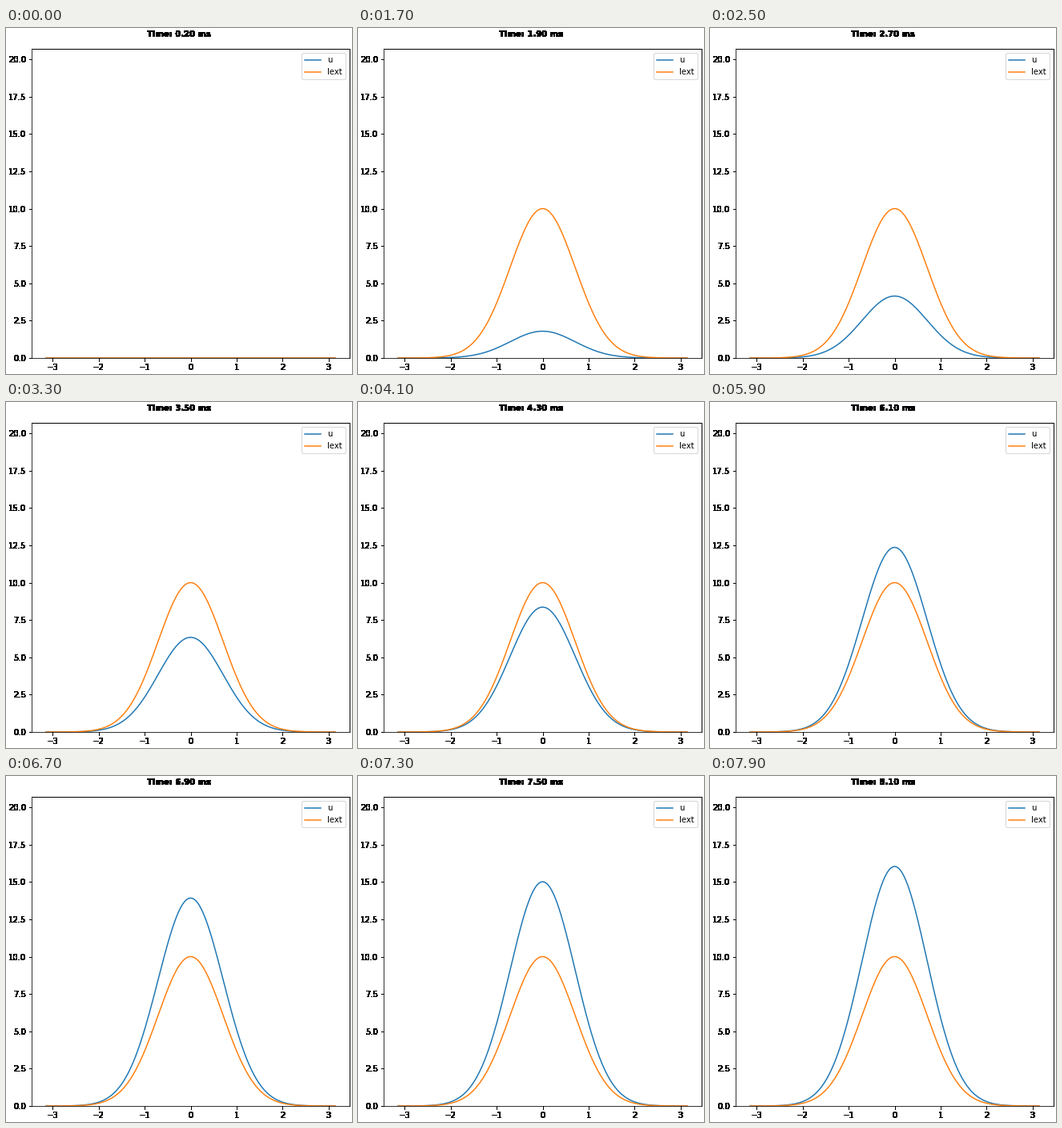
Animation of 432 by 432 pixels, one loop 8 s. Source, as a matplotlib script:

```python
import numpy as np
import matplotlib.pyplot as plt
from matplotlib.animation import FuncAnimation

SIZE, DPI = 432, 72
FRAMES, INTERVAL = 80, 100
DT, TAU = 0.1, 10.0
ONSET = 10              # step at which the stimulus switches on
AMP = 10.0              # stimulus height
J0, K, A, CELLS = 4.0, 0.1, 0.5, 512

x = np.linspace(-np.pi, np.pi, CELLS)
bump = np.exp(-0.25 * (x / A) ** 2)


def peaks(steps):
    """Height of the activity bump at each step (attractor network, Euler)."""
    rho = CELLS / (2 * np.pi)
    gain = J0 / (np.sqrt(2 * np.pi) * A) * rho * np.sqrt(np.pi) / 2
    norm = K * rho * np.sqrt(np.pi / 2)
    u = np.zeros(steps)
    for i in range(ONSET, steps - 1):
        recurrent = gain * u[i] ** 2 / (1 + norm * u[i] ** 2)
        u[i + 1] = u[i] + DT / TAU * (AMP + recurrent - u[i])
    return u


def solid(img, dpi):
    """Make every touched pixel opaque, for hard-edged text."""
    img = img.copy()
    img[..., 3] = img[..., 3] > 0
    return img, 0, 0


height = peaks(FRAMES + 2)

fig = plt.figure(figsize=(SIZE / DPI, SIZE / DPI), dpi=DPI, facecolor="white")
ax = fig.add_axes([32 / SIZE, 20 / SIZE, 397 / SIZE, 386 / SIZE])
u_line, = ax.plot(x, 0 * x, label="u")
ext_line, = ax.plot(x, 0 * x, label="Iext")
ax.set_xlim(-1.1 * np.pi, 1.1 * np.pi)
ax.set_ylim(0, 20.7)
ax.set_xticks(range(-3, 4))
ax.set_yticks(np.arange(0, 20.1, 2.5))
ax.legend(loc="upper right")
title = fig.suptitle("", y=429 / SIZE, fontsize=10, fontweight="bold")

hard = [title, ax.spines["top"], ax.spines["right"]]
for axis in (ax.xaxis, ax.yaxis):
    for tick in axis.get_major_ticks():
        hard += [tick.label1, tick.tick1line]
for artist in hard:
    artist.set_agg_filter(solid)


def update(frame):
    step = frame + 1
    u_line.set_ydata(height[step] * bump)
    ext_line.set_ydata((AMP if step >= ONSET else 0) * bump)
    title.set_text(f"Time: {(step + 1) * DT:.2f} ms")
    return u_line, ext_line, title


anim = FuncAnimation(fig, update, frames=FRAMES, interval=INTERVAL,
                     repeat=True, repeat_delay=0, blit=False)
plt.show()
```
